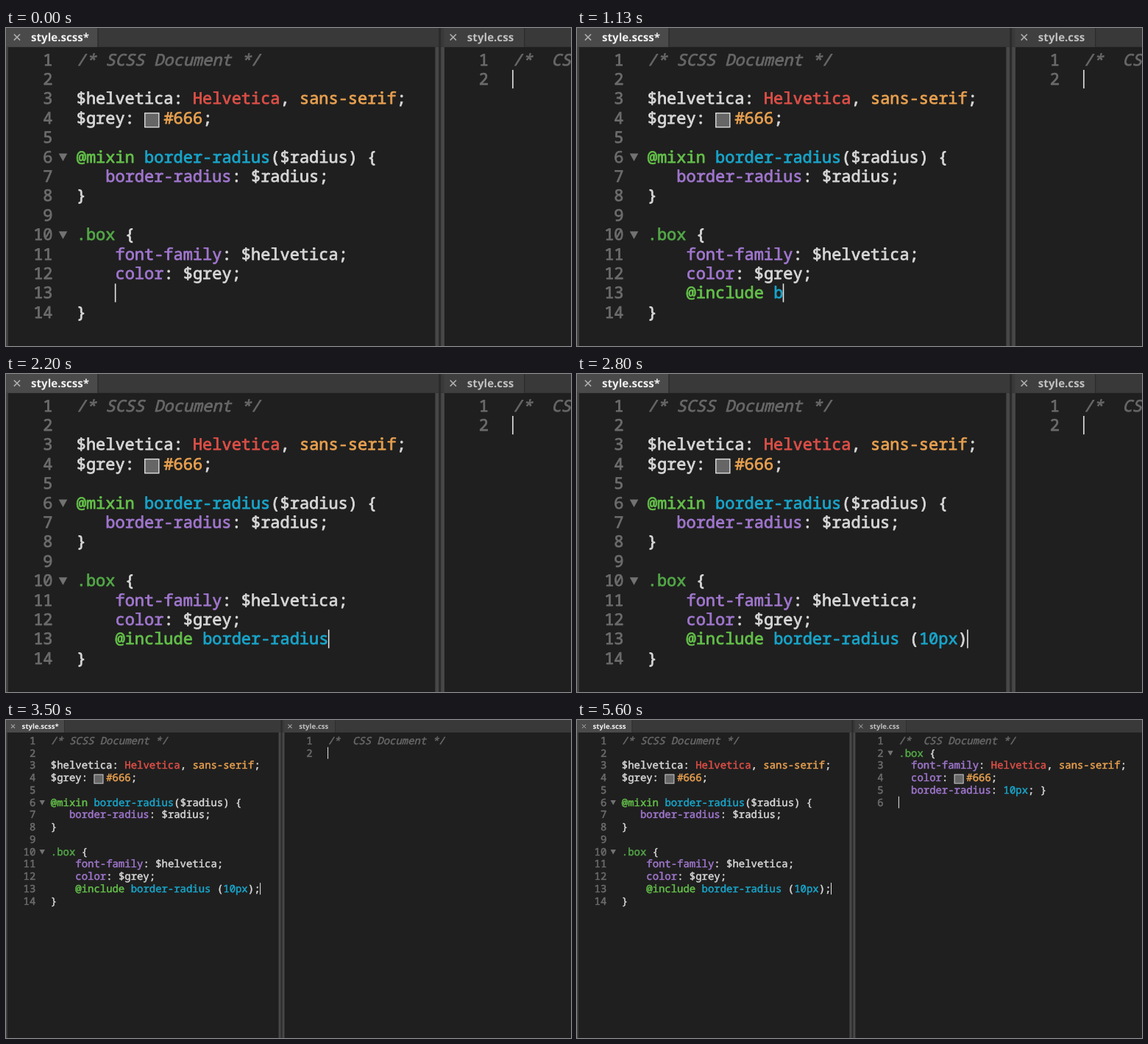
An HTML page with a canvas that plays this animation: 768 by 432 pixels, repeating every 5.63 s.

```html
<!DOCTYPE html>
<html lang="en">
<head>
<meta charset="utf-8">
<title>SCSS mixin demo</title>
<style>
  html, body { margin: 0; width: 100%; height: 100%; overflow: hidden; background: #1f1f1f; }
  canvas { display: block; }
</style>
</head>
<body>
<canvas id="stage" width="768" height="432"></canvas>
<script>
const ctx = document.getElementById('stage').getContext('2d');
ctx.textRendering = 'geometricPrecision';
ctx.lineJoin = 'round';

const LOOP = 5630, ZOOM = 1.575, SAVED_AT = 4600;
const COL = 8.37, ROW = 16.76, FIRST_BASE = 32.8, BAR = 17;
const CODE_FONT = '13.95px "Noto Sans Mono", monospace';
const CODE_WEIGHT = 0.5;
const LEFT = { text: 60.8, num: 40.3, fold: 49.2 };
const RIGHT = { text: 437.3, num: 416.5, fold: 426 };

const C = {
  w: '#d8d8d8', r: '#dd4f47', o: '#e8a04f', g: '#64c04a', d: '#53a847',
  c: '#18a5ca', p: '#a177cf', m: '#676767'
};

// Each line is a list of [colour key, text]; "■" stands for a two-column swatch.
const scss = [
  [['m', '/* SCSS Document */']],
  [],
  [['w', '$helvetica: '], ['r', 'Helvetica'], ['w', ', '], ['o', 'sans-serif'], ['w', ';']],
  [['w', '$grey: '], ['■', '  '], ['o', '#666'], ['w', ';']],
  [],
  [['g', '@mixin '], ['c', 'border-radius'], ['w', '($radius) {']],
  [['p', '   border-radius'], ['w', ': $radius;']],
  [['w', '}']],
  [],
  [['d', '.box'], ['w', ' {']],
  [['p', '    font-family'], ['w', ': $helvetica;']],
  [['p', '    color'], ['w', ': $grey;']],
  [['g', '    @include '], ['c', 'border-radius '], ['w', '('], ['c', '10px'], ['w', ');']],
  [['w', '}']]
];
const cssEmpty = [[['m', '/*  CSS Document */']], []];
const cssBuilt = [
  cssEmpty[0],
  [['d', '.box'], ['w', ' {']],
  [['p', '  font-family'], ['w', ': '], ['r', 'Helvetica'], ['w', ', '], ['o', 'sans-serif'], ['w', ';']],
  [['p', '  color'], ['w', ': '], ['■', '  '], ['o', '#666'], ['w', ';']],
  [['p', '  border-radius'], ['w', ': '], ['c', '10px'], ['w', '; }']],
  []
];

const clamp = x => Math.max(0, Math.min(1, x));
const ramp = (t, from, to) => clamp((t - from) / (to - from));
const easeInOut = x => x < 0.5 ? 4 * x ** 3 : 1 - 4 * (1 - x) ** 3;
const baseline = row => FIRST_BASE + row * ROW;

function rect(x, y, w, h, color) {
  ctx.fillStyle = color;
  ctx.fillRect(x, y, w, h);
}

// weight is the width of an outline that thickens the letters
function label(str, x, y, font, color, weight = 0, align = 'left') {
  ctx.font = font;
  ctx.fillStyle = ctx.strokeStyle = color;
  ctx.textAlign = align;
  ctx.fillText(str, x, y);
  if (weight) {
    ctx.lineWidth = weight;
    ctx.strokeText(str, x, y);
  }
}

function swatch(x, y) {
  rect(x, y - 9.5, 13, 13, '#dcdcdc');
  rect(x + 0.9, y - 8.6, 11.2, 11.2, '#666');
}

function fold(x, y) {
  ctx.fillStyle = '#727272';
  ctx.beginPath();
  ctx.moveTo(x - 3.7, y - 7.7);
  ctx.lineTo(x + 3.7, y - 7.7);
  ctx.lineTo(x, y - 1);
  ctx.fill();
}

function caret(pane, row, col) {
  rect(pane.text + col * COL - 0.4, baseline(row) - 12.8, 1, 16, '#e6e6e6');
}

function codeLine(segments, x, y, limit = Infinity) {
  let col = 0;
  for (const [key, str] of segments) {
    const px = x + col * COL;
    if (key === '■') swatch(px, y);
    else {
      const font = key === 'm' ? 'italic ' + CODE_FONT : CODE_FONT;
      // Leading blanks only move the pen
      const shown = str.slice(0, Math.max(0, limit - col));
      const indent = shown.length - shown.trimStart().length;
      label(shown.trimStart(), px + indent * COL, y, font, C[key], CODE_WEIGHT);
    }
    col += str.length;
  }
}

function editor(lines, pane, folds, typedRow = -1, limit = 0) {
  lines.forEach((line, i) => {
    const y = baseline(i);
    label(i + 1, pane.num, y, CODE_FONT, '#6c6c6c', CODE_WEIGHT, 'right');
    codeLine(line, pane.text, y, i === typedRow ? limit : Infinity);
  });
  folds.forEach(row => fold(pane.fold, baseline(row)));
}

function tab(x, width, name, nameX, fill, color) {
  rect(x, 0, width, BAR, fill);
  rect(x + width, 0, 0.8, BAR, '#2c2c2c');
  const cx = nameX - 12.1, cy = 8.6, r = 2.6;
  ctx.strokeStyle = '#b0b0b0';
  ctx.lineWidth = 1;
  ctx.beginPath();
  ctx.moveTo(cx - r, cy - r);
  ctx.lineTo(cx + r, cy + r);
  ctx.moveTo(cx + r, cy - r);
  ctx.lineTo(cx - r, cy + r);
  ctx.stroke();
  label(name, nameX, 12, 'bold 9.6px "Open Sans", sans-serif', color);
}

function chrome(saved) {
  rect(0, -3, 768, BAR + 3, '#393939');
  tab(0, saved ? 74.5 : 79, saved ? 'style.scss' : 'style.scss*', 21.6, '#4a4a4a', '#f0f0f0');
  tab(378, 69, 'style.css', 398, '#3f3f3f', '#c0c0c0');
  rect(0, BAR, 1.8, 432, '#434343');
  rect(370.4, BAR, 8, 432, '#474747');
  rect(373.4, 0, 2, 432, '#2b2b2b');
}

function shortcut(alpha) {
  ctx.globalAlpha = alpha;
  ctx.fillStyle = 'rgba(0, 0, 0, 0.08)';
  ctx.beginPath();
  ctx.roundRect(178, 264, 420, 112, 12);
  ctx.fill();
  // Fill and outline overlap, so the fade is carried by an opaque grey
  ctx.globalAlpha = 1;
  const grey = Math.round(31 + 224 * alpha);
  label('Cmd/Ctrl + S', 385, 336, '45px "Open Sans", sans-serif',
    `rgb(${grey}, ${grey}, ${grey})`, 1.7, 'center');
}

function draw(t) {
  const scale = ZOOM + (1 - ZOOM) * easeInOut(ramp(t, 2997, 3530));
  const typed = Math.max(0, Math.min(30, Math.floor((t - 200) / 89)));
  const saved = t >= SAVED_AT;

  ctx.setTransform(1, 0, 0, 1, 0, 0);
  rect(0, 0, 768, 432, '#1f1f1f');
  ctx.setTransform(scale, 0, 0, scale, 0, -1.7 * (scale - 1));
  chrome(saved);
  editor(scss, LEFT, [5, 9], 12, 4 + typed);
  caret(LEFT, 12, 4 + typed);
  editor(saved ? cssBuilt : cssEmpty, RIGHT, saved ? [1] : []);
  caret(RIGHT, saved ? 5 : 1, 0);

  ctx.setTransform(1, 0, 0, 1, 0, 0);
  const alpha = 0.6 * ramp(t, 3750, 4000) * (1 - ramp(t, 4380, 4640));
  if (alpha > 0) shortcut(alpha);
}

const start = performance.now();
function tick() {
  draw((performance.now() - start) % LOOP);
  requestAnimationFrame(tick);
}
tick();
</script>
</body>
</html>
```
